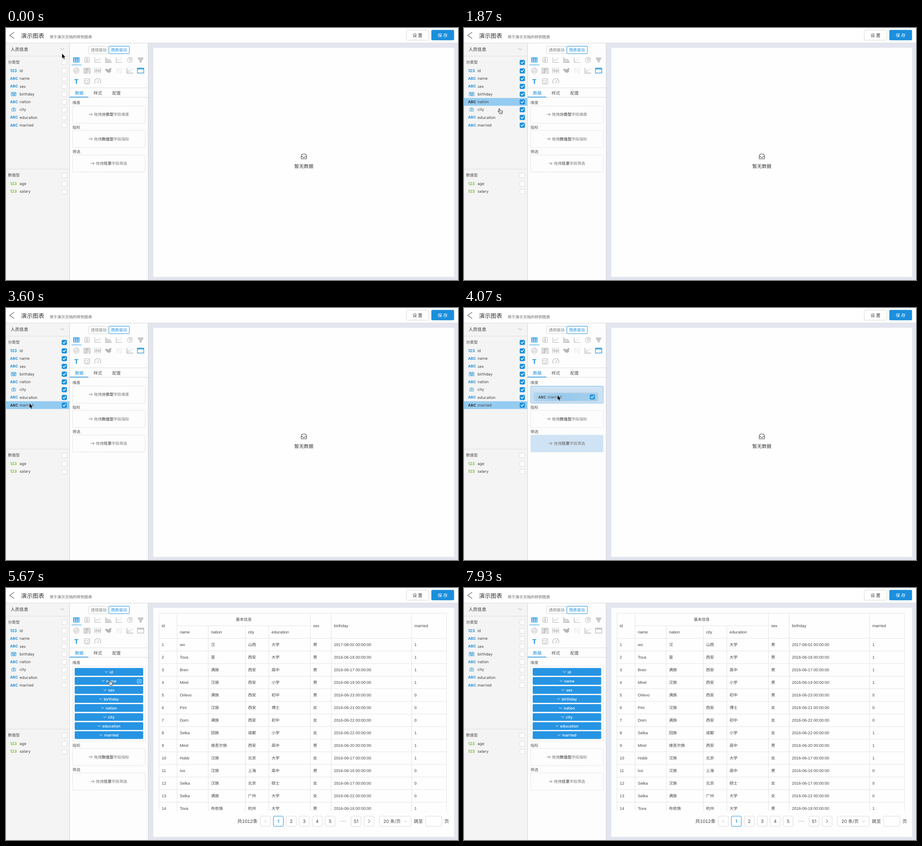
An HTML page with a canvas for the animation above (7990 ms loop, 1000 px wide and 560 px high).

```html
<!DOCTYPE html>
<html lang="zh-CN">
<head>
<meta charset="utf-8">
<title>演示图表</title>
<style>
html, body { margin: 0; width: 100%; height: 100%; overflow: hidden; background: #fff; }
canvas { display: block; width: 100%; height: 100%; }
</style>
</head>
<body>
<canvas id="stage"></canvas>
<script>
const LOOP = 7990, DRAG = 3620, DROP = 4870, UNCHECK = 5070, LOADED = 5250, HIDE = 6900, CHECK = 870;
const BLUE = '#1b8fdc', INK = '#444', ICON = '#b5b5b5', LINE = '#dcdcdc', ZONE = '#cfe3f4';
const UI = "Inter, 'Noto Sans CJK SC', 'Noto Sans CJK', sans-serif";
const GRID = "'Liberation Sans', 'Noto Sans CJK SC', 'Noto Sans CJK', sans-serif";

const stage = document.getElementById('stage');
const dpr = window.devicePixelRatio || 1;
stage.width = 1000 * dpr;
stage.height = 560 * dpr;
const c = stage.getContext('2d');
c.textRendering = 'geometricPrecision';

const clamp = (v, a = 0, b = 1) => Math.min(b, Math.max(a, v));

// Drawing helpers
function text(s, x, cy, size, color = INK, { align = 'left', weight = 400, font = UI } = {}) {
  c.font = `${weight} ${size}px ${font}`;
  c.textAlign = align;
  c.fillStyle = color;
  c.fillText(s, x, cy + size * 0.365);
  return c.measureText(s).width;
}
function rect(x, y, w, h, fill, stroke, r = 0, dash = [], width = 1) {
  c.beginPath();
  c.roundRect(x, y, w, h, r);
  if (fill) { c.fillStyle = fill; c.fill(); }
  if (stroke) {
    c.strokeStyle = stroke;
    c.lineWidth = width;
    c.setLineDash(dash);
    c.stroke();
    c.setLineDash([]);
  }
}
function path(d, x, y, stroke, width = 1, fill) {
  c.save();
  c.translate(x, y);
  const p = new Path2D(d);
  c.lineCap = c.lineJoin = 'round';
  if (fill) { c.fillStyle = fill; c.fill(p); }
  if (stroke) { c.strokeStyle = stroke; c.lineWidth = width; c.stroke(p); }
  c.restore();
}
const hline = (x1, x2, y, color = LINE, h = 1) => rect(x1, y, x2 - x1, h, color);
const vline = (x, y1, y2, color = LINE) => rect(x, y1, 1, y2 - y1, color);
const chevron = (x, y, color, s = 1) => path(`M${-3 * s} ${-1.6 * s}L0 ${1.7 * s}L${3 * s} ${-1.6 * s}`, x, y, color, 0.9);

function checkbox(x, y, on) {
  rect(x - 5.2, y - 5.2, 10.4, 10.4, on ? BLUE : '#fff', on ? BLUE : '#dadada', 1.5);
  if (on) path('M-2.8 0L-.8 2.2L3-2.3', x, y, '#fff', 1.5);
}

// Field list
const FIELDS = [['123', 'id'], ['ABC', 'name'], ['ABC', 'sex'], ['cal', 'birthday'],
  ['ABC', 'nation'], ['city', 'city'], ['ABC', 'education'], ['ABC', 'married']];
const PITCH = 17.25;

function field(kind, name, y, color, x = 0) {
  if (kind === 'cal') {
    path('M-5-3.3H5V4H-5ZM-5-1.2H5M-2.5-4.6V-2.8M2.5-4.6V-2.8M-3 1.4H3M-1.5-.5V3.2M1.5-.5V3.2', x + 17, y, color, 0.9);
  } else if (kind === 'city') {
    path('M-4-2.2H4V3.5H-4ZM-1.6-2.2V-3.8H1.6V-2.2M-2 .3H2M-1 1.8H1', x + 17, y, color, 0.8);
  } else {
    text(kind, x + 9, y, kind === 'ABC' ? 8.1 : 8.8, color, { weight: 700 });
  }
  text(name, x + 30, y, 8.5, INK);
}

function leftPanel(t, hot) {
  rect(0, 34, 140, 526, '#f4f4f4');
  vline(140, 34, 560, '#d4d4d4');
  text('人员信息', 10, 47, 9.8, '#333');
  chevron(124.5, 47.2, '#999', 1.15);
  hline(0, 140, 62);
  hline(0, 140, 313);
  const on = t >= CHECK && t < UNCHECK;
  text('分类型', 4.5, 76, 8.6);
  checkbox(129, 76.5, on);
  FIELDS.forEach(([kind, name], i) => {
    const y = 95 + PITCH * i;
    if (i === hot) rect(0, y - 8.6, 140, PITCH, '#94cbf0');
    field(kind, name, y, i === hot ? '#333' : BLUE);
    checkbox(129, y + 0.3, on);
  });
  text('数值型', 4.5, 327, 8.6);
  checkbox(129, 327.5, false);
  ['age', 'salary'].forEach((name, i) => {
    const y = 346 + PITCH * i;
    field('123', name, y, '#7fbf3f');
    checkbox(129, y + 0.3, false);
  });
}

// Chart type icons: path, line width, optional fill flag
const ICONS = [
  ['M-6.2-5H6.2V5H-6.2ZM-6.2-4.4H6.2M-6.2-1.6H6.2M-6.2 1.7H6.2M-2-5V5M2.1-5V5', 1.2],
  ['M-5.5-3.5Q-5.5-5.8-3.2-5.8H3.2Q5.5-5.8 5.5-3.5V3.5Q5.5 5.8 3.2 5.8H-3.2Q-5.5 5.8-5.5 3.5ZM-1.5-3.5H1.5M-2-1H2V3.5H-2ZM0 1V2', 1],
  ['M-6.5-5.5V5.5H6.5M-4.5 2.5L-2-1L1 1.2L6-4.5', 1],
  ['M-6.3-5.5V5.5H6.5M-3.5 4V-3.5M-.8 4V-1M2-2V4M4.8 4V.5', 1.5],
  ['M-6.5-5.5V5.5H6.5M-4 3h.1M-3 0h.1M-1 1.5h.1M0-2h.1M2 0h.1M3-3.5h.1M5-1.5h.1M5-5h.1', 1.2],
  ['M-1-5.5A5.6 5.6 0 1 0 5.5 1.5H-1ZM2-6A5 5 0 0 1 6-1.5H2Z', 1],
  ['M-5.5-4H5.5M-4.2-1.2H4.2M-2.5 1.6H2.5M-1.5 4.4H1.5', 2],
  ['M-6 0A6 6 0 1 0 6 0A6 6 0 1 0-6 0M-4.5-3.5Q0-1-1 2Q2 1 4.5 3.8M0-6Q1-2 5.5-1.5M-6 0Q-2 1-2.5 5.3M1-2L3 1', 1],
  ['M-7.5-5.2H-3M0-5.2H7.5M-7.5-1.8H0M3-1.8H7.5M-7.5 1.8H-2M1 1.8H7.5M-7.5 5.2H1M4 5.2H7.5M-3-5L3-2M0-2L-2 5', 1.7],
  ['M-6.5-6V6M-2.2-6V6M2.2-6V6M6.5-6V6M-6.5-3L-2.2 2L2.2-1L6.5 3M-6.5 3L-2.2-2L2.2 3L6.5-3', 1],
  ['M-7-3.5L-4-4L-1.5-2.5L1.5-3L4-6L7-4L5-1.5L5.5 2L2 5L-1 3.5L-3 4L-4 1L-6.5-.5Z', 0.5, true],
  ['M-6-3.5H-1M1-4.5H3M5-5H7M-7-.2H-3M0-.5H6M-4 3H-1M1 3H5M3 5.5H6M-6 5H-5', 0.8],
  ['M-6.5-5.5V5.5H6.5M-4 3V1M-1.5 1.5V-.5M1-.5h.1M3.5-2h.1M6-4h.1', 1.4],
  ['M-7-5.5H7V5.5H-7ZM-7-4.8H7M-7-3.2H7', 1.2],
  null,
  ['M-6-4Q-6-6-4-6H4Q6-6 6-4V4Q6 6 4 6H-4Q-6 6-6 4ZM-5-1L-2-3L1-1L5-4M-3 5V1.5M0 5V2M3 5V.5', 1],
  ['M-6 4.5A7 7 0 1 1 6 4.5M-1 4L3-2M-4.5 1h.1M-2.5-2h.1', 1.2]
];

function chartIcons(t) {
  ICONS.forEach((icon, i) => {
    const x = 155.6 + (i % 7) * 23.7, y = 71 + Math.floor(i / 7) * 23.7;
    if (!icon) return void text('T', x, y + 0.3, 14, BLUE, { align: 'center', weight: 700 });
    const active = i === 0 || (i === 13 && t < DROP);
    const color = active ? BLUE : i === 11 ? '#d2d2d2' : ICON;
    path(icon[0], x, y, color, icon[1], icon[2] && color);
  });
  hline(145, 167, 81.5, BLUE);
}

function hint(a, b, d, y) {
  const size = 8.6, width = (a + b + d).length * size;
  let x = 233.5 - width / 2;
  path('M-4 0H3.5M.5-3L3.5 0L.5 3', x - 7.5, y, '#777', 0.9);
  x += text(a, x, y, size, '#777');
  x += text(b, x, y, size, '#666', { weight: 700 });
  text(d, x, y, size, '#777');
}

function zone(y, h, alpha, fill, stroke = '#cfcfcf') {
  c.globalAlpha = alpha;
  rect(147.5, y, 160.5, h, fill, stroke, 1.5, [2, 1.6], 0.9);
  c.globalAlpha = 1;
}

function pill(name, y, hover) {
  rect(152, y - 8.6, 151.5, 17.2, '#2694e3', null, 2);
  c.font = `500 8.5px ${UI}`;
  const w = c.measureText(name).width;
  text(name, 233, y, 8.5, '#fff', { align: 'center', weight: 500 });
  chevron(233 - w / 2 - 7, y, '#fff', 0.9);
  if (hover) path('M-4-4H4V4H-4ZM-1.7-1.7L1.7 1.7M1.7-1.7L-1.7 1.7', 295, y + 0.7, '#fff', 0.8);
}

function midPanel(t, pos) {
  rect(141, 34, 173, 526, '#fdfdfd');
  vline(314, 34, 560, '#cfd2d8');
  rect(182.5, 40.5, 45, 16.5, '#fff', '#d4d4d4', 2);
  rect(227.5, 40.5, 45.5, 16.5, '#fff', BLUE, 2);
  text('透视驱动', 205, 48.7, 8.7, '#777', { align: 'center' });
  text('图表驱动', 250, 48.7, 8.7, BLUE, { align: 'center', weight: 500 });
  chartIcons(t);
  hline(141, 314, 132.5);
  hline(141, 314, 153.5);
  hline(141, 182, 152.7, BLUE, 1.6);
  ['数据', '样式', '配置'].forEach((s, i) =>
    text(s, 162 + i * 41.3, 144.5, 9.5, i ? '#555' : BLUE, { align: 'center', weight: i ? 400 : 500 }));

  const dragging = t >= DRAG && t < DROP, dropped = t >= DROP;
  const over = dragging && pos.x > 148;
  const shift = dropped ? 129 : 0;
  const fade = dropped ? clamp((t - DROP) / 300) : 1;
  const label = (s, y) => text(s, 147, y, 8.7, '#555', { weight: 500 });

  label('维度', 166);
  zone(173.5, dropped ? 166.5 : 38, fade, dragging && ZONE, over ? BLUE : dragging ? ZONE : undefined);
  if (dropped) {
    FIELDS.forEach(([, name], i) => pill(name, 186.4 + i * 20.07, i === 1 && t >= LOADED && t < HIDE));
  } else if (!over) {
    hint('拖拽', '分类型', '字段维度', 192);
  }
  label('指标', 220.7 + shift);
  zone(227.7 + shift, 38, 1);
  hint('拖拽', '数值型', '字段指标', 246.5 + shift);
  label('筛选', 275.2 + shift);
  zone(282.2 + shift, 38, fade, dragging && ZONE, dragging ? ZONE : undefined);
  hint('拖拽', '任意', '字段筛选', 301 + shift);

  if (dragging) ghost(pos.x - 52, pos.y + 3.7, over);
}

function ghost(x, y, over) {
  c.save();
  if (over) {
    c.globalAlpha = 0.35;
    rect(152, 183.5, 151, 23, null, '#8aa9c2', 1, [2, 2], 0.8);
  }
  c.globalAlpha = 0.85;
  const g = c.createLinearGradient(x, 0, x + 141, 0);
  g.addColorStop(0, '#b5d9f2');
  g.addColorStop(0.4, '#94cbf0');
  g.addColorStop(1, '#a5d2f1');
  c.shadowColor = 'rgba(60,90,120,.35)';
  c.shadowBlur = 4 * dpr;
  rect(x, y - 8.6, 141, PITCH, g);
  c.shadowColor = 'transparent';
  field('ABC', 'married', y, '#333', x);
  checkbox(x + 129, y, true);
  c.restore();
}

// Result table
const COLS = [338.5, 378.5, 447.5, 529.5, 581.5, 673.5, 719.5, 897.5, 974.5];
const PEOPLE = `wo 汉 山西 大学 男 17-08-02 1
Tova 苗 西安 大学 男 16-06-18 1
Bren 满族 西安 高中 男 16-06-17 1
Mirel 汉族 西安 小学 男 16-06-19 1
Orlevo 满族 西安 初中 男 16-06-23 0
Pim 汉族 西安 博士 女 16-06-21 0
Dorn 满族 西安 初中 女 16-06-22 0
Selka 回族 成都 小学 女 16-06-22 1
Mirel 维吾尔族 西安 高中 男 16-06-20 1
Hobb 汉族 北京 大学 女 16-06-17 1
Ivo 汉族 上海 高中 男 16-06-16 0
Selka 汉族 北京 硕士 女 16-06-17 0
Selka 满族 广州 大学 女 16-06-22 0
Tova 布依族 杭州 大学 男 16-06-18 1`.split('\n').map((row, i) => [i + 1, ...row.split(' ')]);

function table() {
  const cell = (s, col, y) => text(s, COLS[col] + 6, y, 8.9, INK, { font: GRID });
  const line = '#e3e3e3';
  COLS.forEach((x, i) => vline(x - 0.5, i > 1 && i < 5 ? 84 : 56, 496, line));
  hline(338, 975, 55.5, line);
  hline(378, 674, 83.5, line);
  text('基本信息', 526, 70, 8.75, INK, { align: 'center' });
  ['id', 'name', 'nation', 'city', 'education', 'sex', 'birthday', 'married']
    .forEach((s, i) => cell(s, i, i && i < 5 ? 98 : 84));
  c.save();
  c.beginPath();
  c.rect(330, 100, 650, 396);
  c.clip();
  PEOPLE.forEach((row, r) => {
    hline(338, 975, 111.5 + r * 28, line);
    row.forEach((s, i) => cell(i === 6 ? `20${s} 00:00:00` : s, i, 126 + r * 28));
  });
  c.restore();
  pager();
}

function pager() {
  const y = 518.3, mid = { align: 'center' };
  const box = (x, w, color = '#d9d9d9') => rect(x - w / 2, 507, w, 22.5, '#fff', color, 2.5);
  text('共1012条', 556.5, y - 0.3, 10.6, INK, { align: 'right', font: GRID });
  box(573.8, 22);
  path('M2-3.5L-2 0L2 3.5', 573.8, y, '#c4c4c4', 1);
  [1, 2, 3, 4, 5].forEach((n, i) => {
    const x = 602.5 + i * 28.65;
    box(x, 22, i ? undefined : BLUE);
    text(n, x, y, 10, i ? INK : BLUE, { ...mid, weight: i ? 400 : 600 });
  });
  for (let i = -1; i < 2; i++) {
    c.beginPath();
    c.arc(745.8 + i * 4.8, y, 1.2, 0, 7);
    c.fillStyle = '#c4c4c4';
    c.fill();
  }
  box(774.5, 22);
  text('51', 774.5, y, 10, INK, mid);
  box(803.3, 22);
  path('M-2-3.5L2 0L-2 3.5', 803.3, y, '#555', 1);
  box(861.3, 70);
  text('20 条/页', 835, y, 9.8);
  chevron(884, y + 0.3, '#bbb');
  text('跳至', 902.5, y, 10);
  box(946.3, 36);
  text('页', 970, y, 10);
}

function rightPanel(t) {
  rect(315, 34, 685, 526, '#e3e6ee');
  rect(326, 44, 665.5, 509, '#fefefe');
  if (t < DROP) {
    path('M-6 .5L-4-5H4L6 .5V5.5H-6ZM-6 .5H-2.5Q-2 2.8 0 2.8T2.5.5H6', 659, 285.3, '#444', 1.1);
    text('暂无数据', 659, 307, 10.6, '#333', { align: 'center' });
  } else if (t < LOADED) {
    const a = -Math.PI / 2 + (t - DROP) / 1000 * Math.PI * 2;
    c.beginPath();
    c.arc(659, 286, 6.5, a, a + Math.PI / 2);
    c.strokeStyle = '#444';
    c.lineWidth = 1;
    c.stroke();
    text('加载中...', 659, 305.3, 10.3, '#333', { align: 'center' });
  } else {
    table();
  }
}

function header() {
  rect(0, 0, 1000, 33, '#fff');
  path('M5-6.7L-4.5 0L5 6.7', 12.7, 16.5, '#666', 1.2);
  text('演示图表', 33, 17.7, 12.9, '#333');
  text('用于演示文档的样例图表', 96.5, 19.8, 8.55, '#666');
  rect(885.5, 4.5, 50, 22.5, '#fff', '#d6d6d6', 2.5);
  text('设 置', 910.3, 16, 9.8, '#444', { align: 'center', weight: 500 });
  rect(941, 4.2, 50.3, 23, BLUE, null, 2.5);
  text('保 存', 966, 16, 9.8, '#fff', { align: 'center', weight: 500 });
  hline(0, 1000, 33, '#d5d7dc');
}

// Pointer: time, x, y
const ROUTE = [[0, 124, 57], [300, 124, 57], [620, 129, 75], [1600, 129, 76], [1870, 78, 179],
  [2100, 62, 212], [2600, 62, 214], [2900, 58, 213], [3270, 63, 225], [3480, 52, 212],
  [DRAG, 52, 212], [4070, 207, 194], [4500, 229, 205], [LOOP, 229, 205]];

function pointerAt(t) {
  const i = Math.max(1, ROUTE.findIndex(k => k[0] > t));
  const [t0, x0, y0] = ROUTE[i - 1], [t1, x1, y1] = ROUTE[i];
  const u = clamp((t - t0) / (t1 - t0)), s = u * u * (3 - 2 * u);
  return { x: x0 + (x1 - x0) * s, y: y0 + (y1 - y0) * s };
}

// The highlight trails the pointer slightly
function hotRow(t) {
  if (t < 1640 || t >= DROP + 60) return -1;
  if (t > 2170) return 7;
  return Math.min(7, Math.floor((pointerAt(t - 70).y - 86.4) / PITCH));
}

const HAND = 'M-1.2 .9Q0 -.8 1.1 .8L1.6 4.2Q3 3.2 3.8 4.6Q5 3.7 5.7 5Q7 4.6 7.2 6L6.8 9.2Q6.2 10 6.2 11.3H.6Q.2 9.8 -1.6 8L-3 6.2Q-2.6 4.8 -1.2 5.8L0 6.8Z';
const ARROW = 'M0 0V10.2L2.4 8L4.1 11.9L5.8 11.2L4.1 7.4H7.3Z';

function pointer(t, { x, y }) {
  if (t >= HIDE) return;
  const hand = (t >= 560 && t < 3230) || t >= DROP;
  if (hand) {
    path(HAND, x, y, '#222', 1, '#fff');
    path('M2.3 7.2V9.2M3.8 7.2V9.2M5.2 7.2V9.2', x, y, '#444', 0.6);
  } else {
    path(ARROW, x, y, '#fff', 1.4);
    path(ARROW, x, y, null, 0, '#000');
  }
}

function draw(t) {
  c.setTransform(dpr, 0, 0, dpr, 0, 0);
  c.clearRect(0, 0, 1000, 560);
  const pos = pointerAt(t);
  rightPanel(t);
  leftPanel(t, hotRow(t));
  midPanel(t, pos);
  header();
  pointer(t, pos);
}

const start = performance.now();
function tick() {
  draw((performance.now() - start) % LOOP);
  requestAnimationFrame(tick);
}
tick();
</script>
</body>
</html>
```
